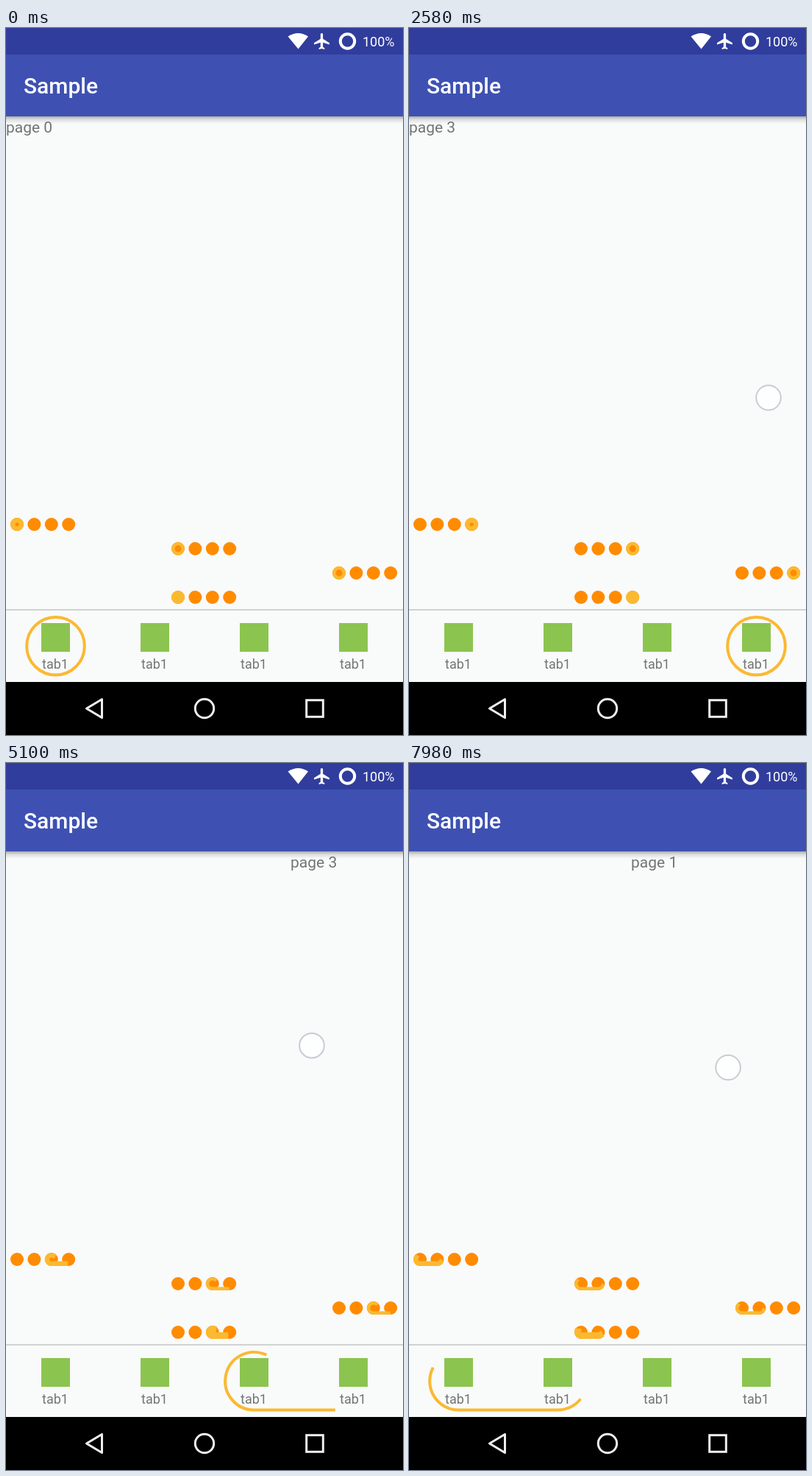
These frames come from a looping animation (540 by 960 pixels, 8 s). An HTML page:

```html
<!DOCTYPE html>
<html lang="en">
<head>
<meta charset="utf-8">
<title>Pager indicator</title>
<style>
  html, body { margin: 0; width: 100%; height: 100%; overflow: hidden; background: #f9fafa; }
  svg { display: block; width: 100%; height: 100%; font-family: Roboto, sans-serif; }
</style>
</head>
<body>
<svg id="stage" viewBox="0 0 540 960">
  <defs>
    <linearGradient id="shade" x2="0" y2="1">
      <stop offset="0" stop-color="#000" stop-opacity=".32"/>
      <stop offset=".4" stop-color="#000" stop-opacity=".12"/>
      <stop offset="1" stop-color="#000" stop-opacity="0"/>
    </linearGradient>
  </defs>
  <rect width="540" height="960" fill="#f9fafa"/>
  <g id="pages" font-size="21" fill="#737474"></g>
  <rect y="120" width="540" height="10" fill="url(#shade)"/>
  <rect y="36" width="540" height="84" fill="#3e51b3"/>
  <rect width="540" height="36" fill="#303d9c"/>
  <g fill="#fff">
    <path d="M397.5 28.5L383.5 11.5Q397.5 2.5 411 11.5Z"/>
    <path transform="translate(416.8 4.8) scale(1.1)" d="M21 16v-2l-8-5V3.5c0-.83-.67-1.5-1.5-1.5S10 2.67 10 3.5V9l-8 5v2l8-2.5V19l-2 1.5V22l3.5-1 3.5 1v-1.5L13 19v-5.5l8 2.5z"/>
    <circle cx="464.5" cy="18" r="9.7" fill="none" stroke="#fff" stroke-width="4"/>
    <text x="485" y="25" font-size="18">100%</text>
    <text x="24" y="89" font-size="30" font-weight="500">Sample</text>
  </g>
  <rect y="789" width="540" height="2" fill="#d0d2d2"/>
  <g id="tabs" font-size="18" fill="#737474" text-anchor="middle"></g>
  <g id="dots" fill="#ff8b00"></g>
  <g id="marks" fill="none" stroke="#fbb931"></g>
  <rect y="888" width="540" height="72"/>
  <g fill="none" stroke="#eee" stroke-width="3">
    <path d="M109.5 924L130.5 911.5V936.5Z" stroke-linejoin="round"/>
    <circle cx="270" cy="924" r="12.7"/>
    <rect x="408.7" y="912.7" width="22.6" height="22.6"/>
  </g>
  <circle id="touch" r="16.8" fill="#fff" fill-opacity=".75" stroke="#cbcbd3" stroke-width="2"/>
</svg>
<script>
const LOOP = 8000, STEP = 60, WIDTH = 540, COUNT = 4;
const $ = id => document.getElementById(id);

function add(parent, tag, attrs, text) {
  const el = document.createElementNS('http://www.w3.org/2000/svg', tag);
  for (const k in attrs) el.setAttribute(k, attrs[k]);
  if (text) el.textContent = text;
  parent.appendChild(el);
  return el;
}

// slack: extra path length each ring takes to unwind
const tracks = [
  { x: 15, y: 674, gap: 23.4, r: 5.8, w: 6.4, slack: 8 },
  { x: 234, y: 707, gap: 23.4, r: 6.75, w: 4.5, slack: 8 },
  { x: 453, y: 740, gap: 23.4, r: 6.75, w: 4.5, slack: 8 },
  { x: 234, y: 773, gap: 23.4, r: 4.5, w: 9, slack: 8 },
  { x: 67.5, y: 839.2, gap: 135, r: 39.3, w: 4, slack: 1 }
];

// shift: how far the page has been dragged when the finger lifts
const swipes = [
  { down: 540, up: 840, rest: 1140, x: [430, 180], y: [560, 550], shift: -250, from: 0, to: 1 },
  { down: 1320, up: 1660, rest: 1870, x: [425, 219], y: [567, 557], shift: -206, from: 1, to: 2 },
  { down: 1900, up: 2140, rest: 2460, x: [440, 190], y: [535, 525], shift: -250, from: 2, to: 3 },
  { down: 2540, up: 2740, rest: 2740, x: [497, 457], y: [502, 502], shift: 0, from: 3, to: 3 },
  { down: 3184, up: 5560, rest: 5860, x: [38.5, 506.6], y: [474, 362], shift: 480, from: 3, to: 2 },
  { down: 6040, up: 6800, rest: 7180, x: [165, 442], y: [424, 398], shift: 277, from: 2, to: 1 },
  { down: 7320, up: 8100, rest: 8400, x: [132, 489], y: [460, 405], shift: 357, from: 1, to: 0 }
];

const pages = [], marks = [];
for (let i = 0; i < COUNT; i++) {
  const x = 67.5 + i * 135;
  pages.push(add($('pages'), 'text', { y: 142 }, 'page ' + i));
  add($('tabs'), 'rect', { x: x - 19.5, y: 808, width: 39, height: 39, fill: '#8cc450' });
  add($('tabs'), 'text', { x: x - .5, y: 870 }, 'tab1');
}
for (const k of tracks) {
  if (k.gap < 100) {
    for (let i = 0; i < COUNT; i++) add($('dots'), 'circle', { cx: k.x + i * k.gap, cy: k.y, r: 9 });
  }
  marks.push(add($('marks'), 'path', { 'stroke-width': k.w }));
}

const mix = (a, b, u) => a + (b - a) * u;

// Ring unrolls counterclockwise onto the baseline and rolls up around the next stop
function ribbon(k, i, f) {
  const ring = 2 * Math.PI * k.r + k.slack, total = ring + k.gap;
  const tail = f * total, head = tail + ring;
  const x0 = k.x + i * k.gap, x1 = x0 + k.gap, base = k.y + k.r;
  const angle = s => s / ring * 2 * Math.PI;
  const at = (cx, a) => `${(cx + k.r * Math.sin(a)).toFixed(2)} ${(k.y + k.r * Math.cos(a)).toFixed(2)}`;
  const arc = (cx, a, b) => [(a + b) / 2, b].map(v => `A${k.r} ${k.r} 0 0 0 ${at(cx, v)}`).join('');

  let d = tail < ring
    ? 'M' + at(x0, angle(tail)) + arc(x0, angle(tail), 2 * Math.PI)
    : `M${x0 + tail - ring} ${base}`;
  d += head < total
    ? `L${x0 + head - ring} ${base}`
    : `L${x1} ${base}` + arc(x1, 0, angle(head - total));
  return d;
}

function position(t) {
  let p = 0;
  for (const s of swipes) {
    if (t < s.down) break;
    const u = Math.min(1, (t - s.down) / (s.up - s.down));
    p = s.from - s.shift * u / WIDTH;
    if (t >= s.rest) p = s.to;
    else if (t > s.up) p = mix(p, s.to, 1 - (1 - (t - s.up) / (s.rest - s.up)) ** 3);
  }
  return p;
}

function draw(t) {
  const p = position(t), i = Math.min(COUNT - 2, Math.floor(p)), f = p - i;
  pages.forEach((el, n) => el.setAttribute('x', (n - p) * WIDTH));
  tracks.forEach((k, n) => {
    marks[n].setAttribute('d', ribbon(k, i, f));
    marks[n].setAttribute('stroke-linecap', f > 0 && f < 1 ? 'square' : 'butt');
  });
  const s = swipes.find(s => t >= s.down && t < s.up), touch = $('touch');
  touch.setAttribute('visibility', s ? 'visible' : 'hidden');
  if (s) {
    const u = (t - s.down) / (s.up - s.down);
    touch.setAttribute('cx', mix(...s.x, u));
    touch.setAttribute('cy', mix(...s.y, u));
  }
}

const start = performance.now();
function tick() {
  const t = (performance.now() - start) % LOOP;
  draw(Math.floor(t / STEP) * STEP);
  requestAnimationFrame(tick);
}
tick();
</script>
</body>
</html>
```
